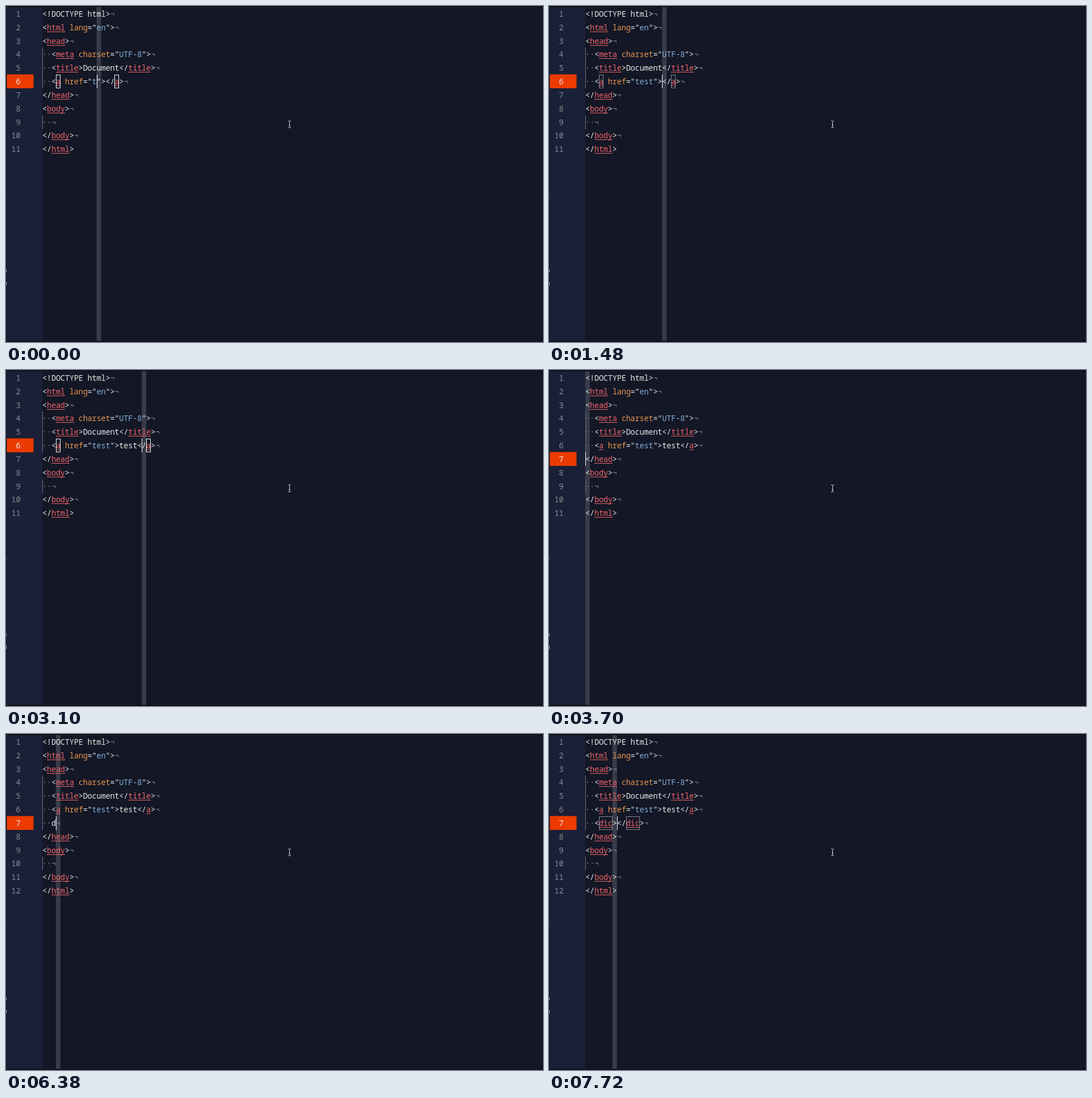
An HTML page with a canvas that plays this animation: 946x592 px, repeating every 8 s.

```html
<!DOCTYPE html>
<html lang="en">
<head>
<meta charset="UTF-8">
<title>Code editor</title>
<style>
  html, body { margin: 0; width: 100%; height: 100%; overflow: hidden; background: #101219; }
  canvas { display: block; }
</style>
</head>
<body>
<canvas width="946" height="592"></canvas>
<script>
const ctx = document.querySelector('canvas').getContext('2d');
const LOOP = 8000, BLINK = 450, CELL = 7.96, LEFT = 64, ROW = 23.82, TOP = 2;
const BASELINE = 17, LINK_ROW = 5, NEW_ROW = 6, LINK_END = 25;

// One entry per key press: time, row, column, href, link text,
// text of the new line, column of the vertical guide if it trails the caret
const keys = [
  [-300, 5, 12, 't', ''],
  [150, 5, 13, 'te', ''],
  [300, 5, 14, 'tes', ''],
  [450, 5, 15, 'test', ''],
  [890, 5, 16, 'test', ''],
  [1330, 5, 17, 'test', ''],
  [1770, 5, 18, 'test', 't'],
  [1920, 5, 19, 'test', 'te'],
  [2070, 5, 20, 'test', 'tes'],
  [2520, 5, 21, 'test', 'test'],
  [2810, 5, 22, 'test', 'test'],
  [3250, 5, 23, 'test', 'test'],
  [3400, 5, 24, 'test', 'test'],
  [3550, 5, 25, 'test', 'test'],
  [3700, 6, 0, 'test', 'test'],
  [3840, 5, 25, 'test', 'test'],
  [4580, 6, 2, 'test', 'test', ''],
  [6230, 6, 3, 'test', 'test', 'd'],
  [6530, 6, 4, 'test', 'test', 'di'],
  [6680, 6, 5, 'test', 'test', 'dic'],
  [7270, 6, 5, 'test', 'test', 'dic'],
  [7570, 6, 7, 'test', 'test', '<dic></dic>', 6]
];

// Groups: tag name, attribute, string, invisible character
const TOKEN = /((?<=<\/?)[a-z]+)|([a-z]+(?==))|((?<=")[\w-]+(?="))|([·¬])|[^]/g;
const COLORS = ['#ee6468', '#e8954d', '#82afd9', '#888b91'];

const colX = col => Math.round(LEFT + col * CELL);
const rowY = row => Math.round(TOP + row * ROW);

function rect(color, x, y, w, h) {
  ctx.fillStyle = color;
  ctx.fillRect(x, y, w, h);
}

function write(text, x, row, color) {
  ctx.fillStyle = color;
  [...text].forEach((char, i) => ctx.fillText(char, x + i * CELL, rowY(row) + BASELINE));
}

function drawLine(line, row, boxAlpha) {
  const y = rowY(row);
  if (line[0] === '·') rect('#73767e', LEFT, y, 1, 24);
  for (const match of line.matchAll(TOKEN)) {
    const [text, tag] = match, col = match.index;
    const kind = match.slice(1).findIndex(Boolean);
    const color = COLORS[kind] || '#e6e7e4';
    write(text, LEFT + col * CELL, row, color);
    if (!tag) continue;
    const x = colX(col), width = colX(col + text.length) - x;
    rect(color, x, y + BASELINE + 2, width, 1);
    if (boxAlpha) {
      ctx.strokeStyle = `rgba(255,255,255,${boxAlpha})`;
      ctx.strokeRect(x + 0.5, y + 0.5, width - 1, 23);
    }
  }
}

function drawPointer(x, y) {
  rect('#d5d6da', x, y - 5, 1, 11);
  for (const dy of [-6, 6]) {
    rect('#d5d6da', x - 2, y + dy, 2, 1);
    rect('#d5d6da', x + 1, y + dy, 2, 1);
  }
  rect('#d5d6da', x - 1, y + 2, 3, 1);
}

function draw(time) {
  const [start, row, col, href, label, added, guide = col] = keys.findLast(key => key[0] <= time);
  const age = time - start;
  const lines = [
    '<!DOCTYPE html>¬', '<html lang="en">¬', '<head>¬',
    '··<meta charset="UTF-8">¬', '··<title>Document</title>¬',
    `··<a href="${href}">${label}</a>¬`,
    ...(added === undefined ? [] : [`··${added}¬`]),
    '</head>¬', '<body>¬', '··¬', '</body>¬', '</html>'
  ];

  // Matching tags fade in shortly after each key
  const inTag = row === LINK_ROW ? col < LINK_END : added?.startsWith('<');
  const dim = age < 285 || row === NEW_ROW;
  const boxAlpha = !inTag || age < 135 ? 0 : dim ? 0.5 : 1;

  rect('#101219', 0, 0, 946, 592);
  rect('#131726', 1, 2, 945, 588);
  rect('#1a2037', 1, 2, 63, 588);
  rect('#1c202e', 699, 2, 1, 588);
  rect('#a4a8ad', 0, 464, 1, 5);
  rect('#a4a8ad', 0, 486, 1, 6);
  rect('#686c73', 0, 332, 1, 2);
  rect('#383b49', LEFT + guide * CELL, 2, CELL, 588);
  rect('#eb3b00', 1.5, rowY(row) - 0.5, 47, 24.5);

  ctx.font = '500 13.6px "Noto Sans Mono", monospace';
  ctx.lineWidth = 1;
  lines.forEach((line, i) => {
    const number = String(i + 1);
    write(number, 25.5 - number.length * CELL, i, i === row ? '#f4e4df' : '#898c93');
    drawLine(line, i, i === row ? boxAlpha : 0);
  });

  if (Math.floor(age / BLINK) % 2 === 0) rect('#fff', colX(col), rowY(row), 1, 24);
  drawPointer(499, 208);
}

function tick() {
  draw(performance.now() % LOOP);
  requestAnimationFrame(tick);
}
tick();
</script>
</body>
</html>
```
